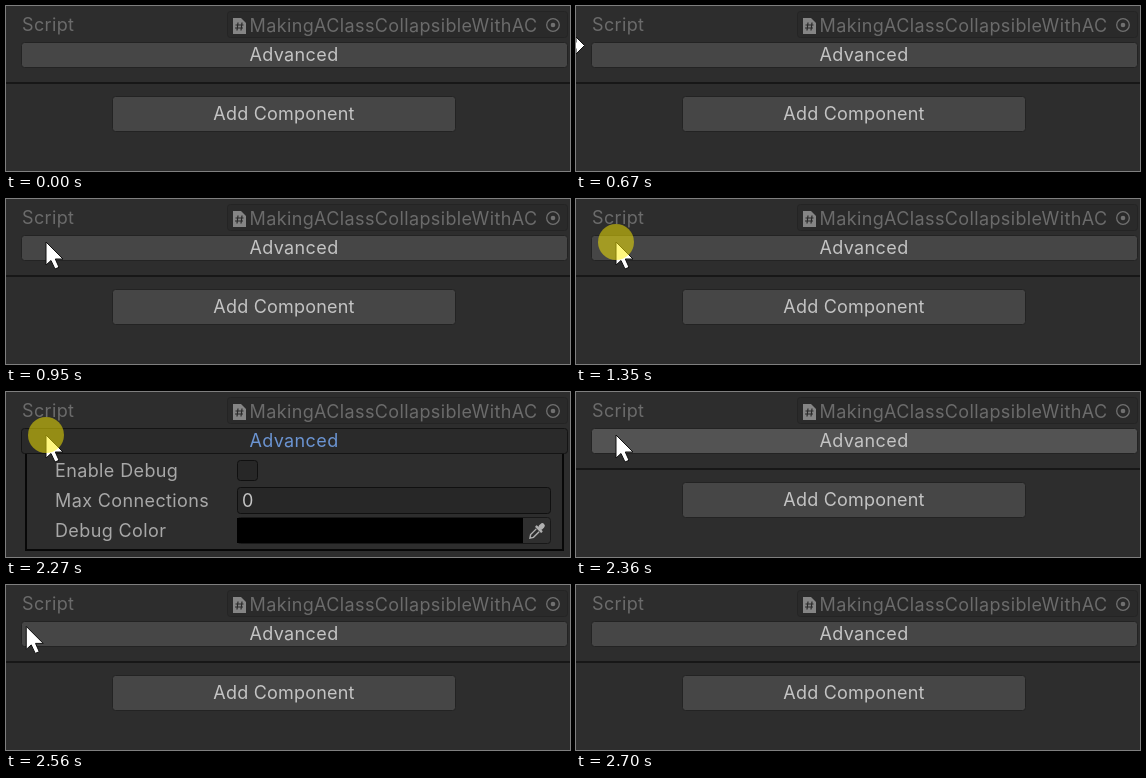
An HTML page that plays this animation: 564 by 165 pixels, repeating every 3100 ms.

```html
<!DOCTYPE html>
<html lang="en">
<head>
<meta charset="utf-8">
<title>Collapsible inspector section</title>
<style>
  html, body { margin: 0; width: 100%; height: 100%; overflow: hidden; background: #2d2d2d; }
  svg { display: block; }
  text { font: 18px Inter, "Open Sans", sans-serif; letter-spacing: .38px; fill: #c4c4c4; }
  .dim { fill: #6b6b6b; }
  .label { fill: #a8a8a8; }
  .mid { text-anchor: middle; }
  .button { fill: #464646; stroke: #232323; }
  .button.hover { fill: #535353; }
  .field { fill: #272727; stroke: #101010; }
  .pointer { fill: #fff; stroke: #111; }
</style>
</head>
<body>
<svg width="564" height="165" viewBox="0 0 564 165">
  <text class="dim" x="16" y="25">Script</text>
  <rect x="221.5" y="5.5" width="340" height="26" rx="3" fill="#2a2a2a" stroke="#242424"/>
  <path d="M227 12h8l5 5v11h-13z" fill="#858585"/>
  <path d="M232 16.500l-1 8M236 16.500l-1 8M229.500 19h8M229 22h8" stroke="#2a2a2a" stroke-width="1.200"/>
  <text class="dim" x="243.500" y="26">MakingAClassCollapsibleWithAC</text>
  <circle cx="547" cy="19" r="6.300" fill="none" stroke="#707070" stroke-width="1.300"/>
  <circle cx="547" cy="19" r="2.300" fill="#707070"/>

  <g id="closed">
    <rect id="header" class="button" x="15.5" y="36.500" width="546" height="25" rx="3"/>
    <text class="mid" x="288" y="55">Advanced</text>
    <path d="M0 77h564" stroke="#171717" stroke-width="2"/>
    <rect class="button" x="106.500" y="90.500" width="343" height="35" rx="3"/>
    <text class="mid" x="278" y="114" style="letter-spacing:.2px">Add Component</text>
  </g>

  <g id="open">
    <path d="M20 61v97h537v-97" fill="none" stroke="#080808" stroke-width="2"/>
    <rect x="15.5" y="36.500" width="546" height="25" rx="3" fill="#2a2a2a" stroke="#141414"/>
    <text class="mid" x="288" y="55" style="fill:#6b94d2">Advanced</text>
    <text class="label" x="49" y="85">Enable Debug</text>
    <text class="label" x="49" y="115">Max Connections</text>
    <text class="label" x="49" y="145">Debug Color</text>
    <rect class="field" x="231.500" y="68.500" width="20" height="20" rx="3"/>
    <rect class="field" x="231.500" y="95.500" width="313" height="26" rx="3"/>
    <text x="236" y="115">0</text>
    <rect x="231.500" y="125.500" width="313" height="26" rx="3" fill="#2f2f2f" stroke="#181818"/>
    <rect x="231" y="126" width="286" height="25"/>
    <g transform="translate(531 139) rotate(45)" fill="#b0b0b0">
      <rect x="-2.500" y="-10" width="5" height="7" rx="2.500"/>
      <rect x="-4.500" y="-4" width="9" height="2.500" rx="1"/>
      <path d="M-2 -1v8l2 3 2-3v-8" fill="none" stroke="#b0b0b0" stroke-width="1.400"/>
    </g>
  </g>

  <path id="arrow" class="pointer" d="M0 0v23l5-4.500 4 8.500 4-1.700-3.700-8.300h7.700z"/>
  <path id="resize" class="pointer" d="M11.500 0l-8.500-8.500v5.500h-6v-5.500l-8.500 8.500 8.500 8.500v-5.500h6v5.500z"/>
  <circle id="click" cx="40" cy="43" r="18" fill="#fff000" opacity=".5"/>
</svg>
<script>
  const LOOP = 3100, STEP = 70;
  const el = id => document.getElementById(id);
  const show = (id, on) => el(id).style.display = on ? "" : "none";
  const during = (t, from, to) => t >= from && t < to;

  // The pointer advances in whole steps, easing in and then leaving to the left.
  function pointer(t) {
    const arrive = Math.min(4, Math.max(0, Math.floor((t - 670) / STEP)));
    const leave = Math.max(0, Math.floor((t - 2490) / STEP) + 1);
    const away = (1 - arrive / 4) ** 2 + 1.3 * (leave / 4) ** 1.5;
    return [40 - 43 * away, 43 - 3.5 * away];
  }

  function draw(now) {
    const t = now % LOOP;
    const open = during(t, 1410, 2360);
    show("open", open);
    show("closed", !open);
    el("header").classList.toggle("hover", during(t, 2360, 2560));
    show("click", during(t, 1280, 1410) || during(t, 2270, 2360));

    // At the panel's left edge the arrow becomes a resize handle.
    const at = pointer(t), visible = during(t, 670, 2700), edge = at[0] < 6;
    show("arrow", visible && !edge);
    show("resize", visible && edge);
    for (const id of ["arrow", "resize"]) el(id).setAttribute("transform", `translate(${at})`);
  }

  const start = performance.now();
  function tick() {
    draw(performance.now() - start);
    requestAnimationFrame(tick);
  }
  tick();
</script>
</body>
</html>
```
